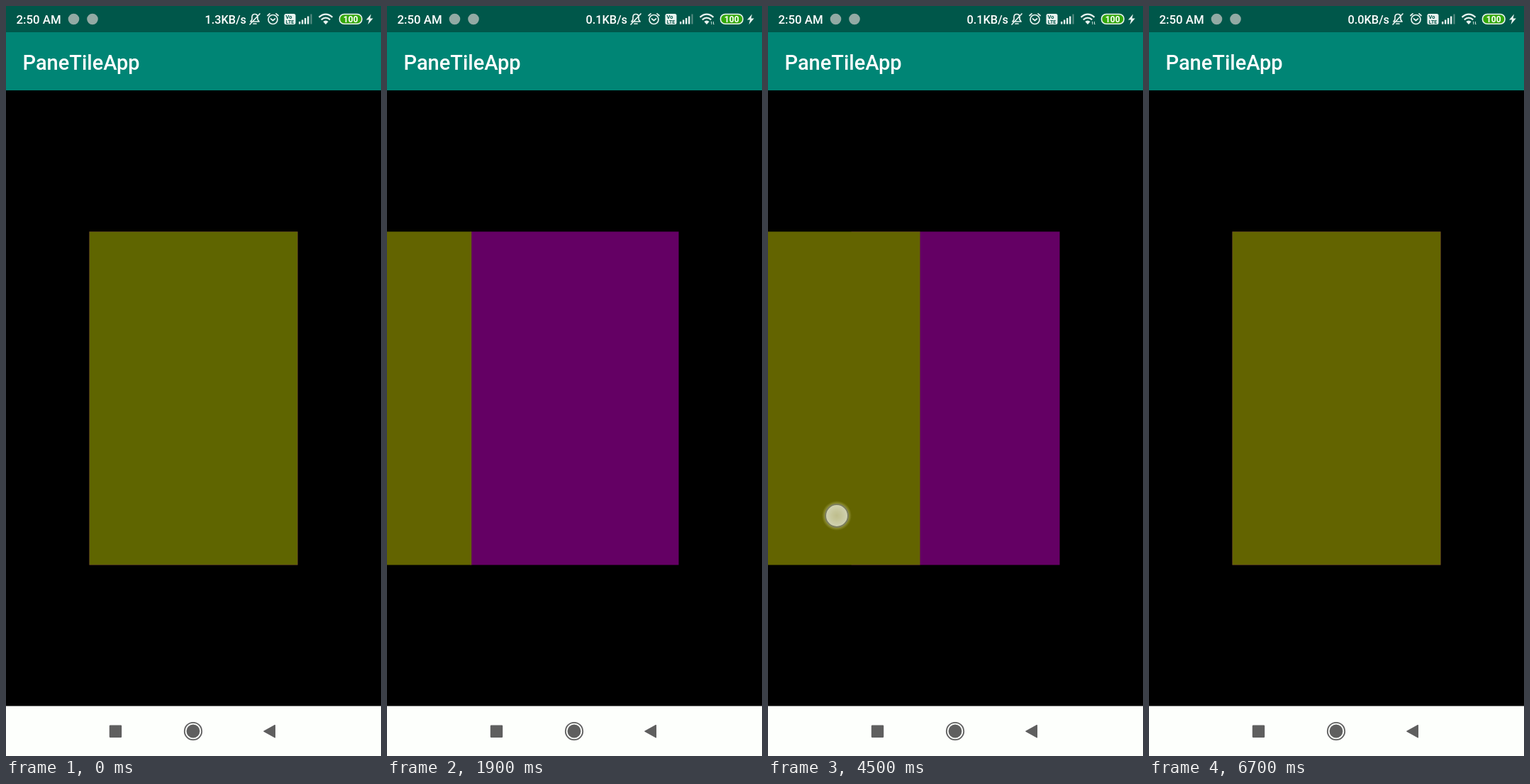
Write an HTML page that moves like this. It is 529 px wide and 1058 px high and loops after 7600 ms.

```html
<!DOCTYPE html>
<html lang="en">
<head>
<meta charset="utf-8">
<title>Swipe cards</title>
<style>
  html, body { margin: 0; width: 100%; height: 100%; overflow: hidden; background: #000; }
  svg { display: block; width: 100%; height: 100%; }
  text { font-family: Roboto, sans-serif; font-weight: 500; fill: #fff; }
  .line { fill: none; stroke: #e9f3f0; stroke-width: 1.7; stroke-linecap: round; stroke-linejoin: round; }
  .soft { fill: #e9f3f0; }
</style>
</head>
<body>
<svg viewBox="0 0 529 1058">
  <defs>
    <radialGradient id="touch">
      <stop offset="0" stop-color="#bebd8c"/>
      <stop offset=".45" stop-color="#c6c69b"/>
      <stop offset="1" stop-color="#d2d3b4"/>
    </radialGradient>
    <radialGradient id="glow">
      <stop offset=".72" stop-color="#c8c878" stop-opacity=".6"/>
      <stop offset="1" stop-color="#c8c878" stop-opacity="0"/>
    </radialGradient>
  </defs>

  <rect width="529" height="1058"/>
  <rect x="117.5" y="318.3" width="294" height="470.2" fill="#640064"/>
  <rect id="card" x="117.5" y="318.3" width="294" height="470.2"/>
  <g id="finger">
    <circle r="21" fill="url(#glow)"/>
    <circle r="16" fill="url(#touch)" stroke="#7b7d5c" stroke-width="2"/>
  </g>

  <!-- App bar -->
  <rect y="37" width="529" height="82" fill="#008575"/>
  <text x="23.5" y="90" font-size="29">PaneTileApp</text>

  <!-- Status bar -->
  <rect width="529" height="37" fill="#00574a"/>
  <text x="14.5" y="25" font-size="16.8" fill="#e9f3f0">2:50 AM</text>
  <g fill="#93aaa4">
    <circle cx="95.5" cy="18.5" r="7.8"/>
    <circle cx="122" cy="18.5" r="7.8"/>
  </g>
  <text id="speed" x="339" y="25" font-size="16.3" text-anchor="end"></text>
  <g class="line">
    <path d="M345 22h12l-2-3v-3c0-6-8-6-8 0v3zM349 25h4M344 26L358 11"/>
    <circle cx="376.5" cy="19" r="6.5"/>
    <path d="M373.5 18l3 2.5 3-2.5M369 13.5l3-2.7M384 13.5l-3-2.7"/>
  </g>
  <rect class="soft" x="392.5" y="11" width="16" height="15" rx="2.5"/>
  <g text-anchor="middle" font-size="7.5">
    <text x="399" y="18" style="fill:#00574a;font-weight:700">Vo</text>
    <text x="400.5" y="25" style="fill:#00574a;font-weight:700" font-size="7">LTE</text>
  </g>
  <path class="soft" d="M413 22h2.4v3.5h-2.4zM417 19.5h2.4v6h-2.4zM421 17h2.4v8.5h-2.4zM425 14.5h2.4v11h-2.4z"/>
  <path d="M429.5 11.5h2v14h-2z" fill="#5d8f85"/>
  <g class="line" style="stroke-width:2.2;stroke-linecap:butt">
    <path d="M441.5 15.8Q451 7.5 460.5 15.8M444.8 19.4Q451 14 457.2 19.4"/>
  </g>
  <path class="soft" d="M447.3 22Q451 19 454.7 22L451 26z"/>
  <path id="traffic" d="M457.8 26v-4M456.8 23l1-1M460.5 22v4M461.5 25l-1 1" stroke="#c5dcd5"/>
  <rect x="470.5" y="11.5" width="31.5" height="13.8" rx="6.5" fill="#34a80b" stroke="#e9f3f0" stroke-width="1.6"/>
  <text x="486.2" y="22.8" font-size="12" text-anchor="middle" style="font-weight:700">100</text>
  <path class="soft" d="M515 11.5L508 19.5h4.2L510.5 26 517.8 17.5h-4.2z"/>

  <!-- Navigation bar -->
  <rect y="987.5" width="529" height="70.5" fill="#fdfffc"/>
  <g fill="#5f5f5f">
    <rect x="145.8" y="1014.5" width="17.4" height="17.4" rx="1.2"/>
    <circle cx="264" cy="1023" r="9.4"/>
    <circle cx="264" cy="1023" r="12.2" fill="none" stroke="#5f5f5f" stroke-width="1.8"/>
    <path d="M364 1023.2L379.3 1014.7V1031.7z" stroke="#5f5f5f" stroke-width="1.5" stroke-linejoin="round"/>
  </g>
</svg>
<script>
const LOOP = 7600, STEP = 100, WIDTH = 294;
const get = id => document.getElementById(id);
const card = get('card'), finger = get('finger'), speed = get('speed'), traffic = get('traffic');

// Each touch path lists [time, x, y]; on release the card settles until `end`.
const swipes = [
  { from: 0, to: -WIDTH, end: 2000,
    path: [[500, 293, 672], [1100, 93.5, 692], [1400, 93.5, 692], [1700, 45, 697]] },
  { from: -WIDTH, to: 0, end: 3600,
    path: [[2300, 49, 690], [2700, 193.5, 668], [3100, 318, 655]] },
  { from: 0, to: -WIDTH, end: 5300,
    path: [[4000, 294, 695], [4500, 97, 719], [4700, 40, 724]] },
  { from: -WIDTH, to: 0, end: 6700,
    path: [[5700, 75, 664], [5900, 135.5, 659], [6400, 325, 650]] }
];

const mix = (a, b, k) => a + (b - a) * k;

function touchAt(path, t) {
  const i = Math.max(1, path.findIndex(p => p[0] >= t));
  const [a, b] = [path[i - 1], path[i]];
  const k = (t - a[0]) / (b[0] - a[0]);
  return [mix(a[1], b[1], k), mix(a[2], b[2], k)];
}

function pose(t) {
  const swipe = swipes.findLast(s => t >= s.path[0][0]);
  if (!swipe) return { shift: 0 };
  const { path, from, to, end } = swipe;
  const up = path.at(-1)[0];
  const [x, y] = touchAt(path, Math.min(t, up));
  const drag = Math.max(-WIDTH, Math.min(0, from + x - path[0][1]));
  if (t < up) return { shift: drag, x, y };
  const k = Math.min(1, (t - up) / (end - up));
  return { shift: mix(drag, to, 1 - (1 - k) ** 3) };
}

function draw(now) {
  const t = Math.floor(now % LOOP / STEP) * STEP;
  const { shift, x, y } = pose(t);
  card.setAttribute('transform', `translate(${shift})`);
  card.setAttribute('fill', t < 500 ? '#5f6500' : '#636400');
  finger.setAttribute('visibility', x === undefined ? 'hidden' : 'visible');
  if (x !== undefined) finger.setAttribute('transform', `translate(${x} ${y})`);
  speed.textContent = (t < 600 ? '1.3' : t < 5000 ? '0.1' : '0.0') + 'KB/s';
  traffic.setAttribute('visibility', t < 600 ? 'hidden' : 'visible');
}

const start = performance.now();
function tick() {
  draw(performance.now() - start);
  requestAnimationFrame(tick);
}
tick();
</script>
</body>
</html>
```
